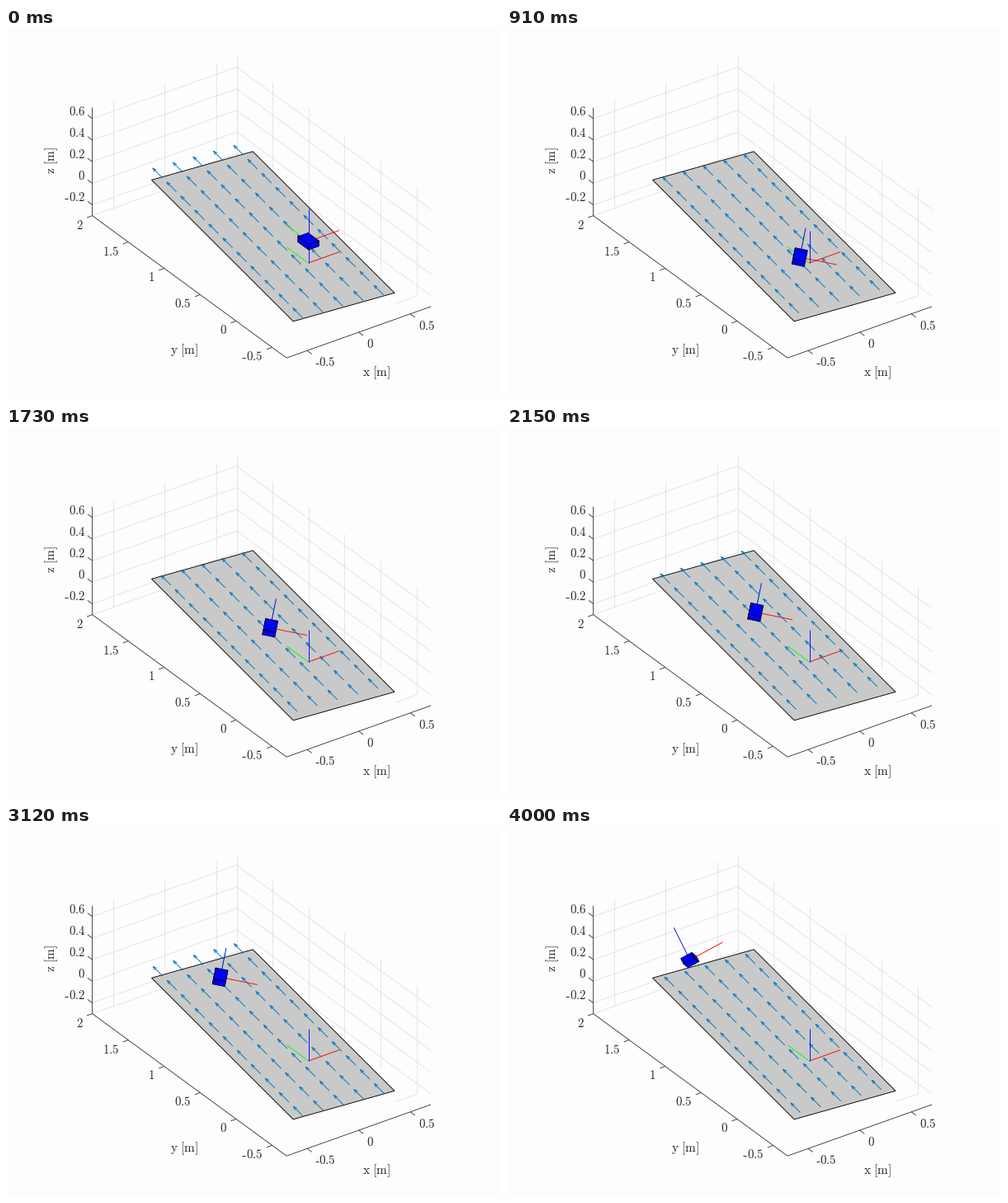
Write a matplotlib script that moves like this. It is 600 px wide and 450 px high and loops after 4.03 s.

```python
import matplotlib.pyplot as plt
import numpy as np
from matplotlib.animation import FuncAnimation
from matplotlib.collections import LineCollection, PolyCollection

plt.rcParams["mathtext.fontset"] = "cm"
W, H, DPI = 600, 450, 100
LOOP, TICK, STEP = 4030, 10, 40
PX = 72 / DPI                       # one pixel in points
INK = "#262626"

# Orthographic view: screen offset in pixels per metre along x, y, z
ORIGIN = np.array([366.5, 285])
VIEW = np.array([[125, -44.5], [-87.2, -63.9], [0, -131]])
SCALE = 152.4
LO, HI = np.array([-.7, -.7, -.3]), np.array([.7, 2, .7])

# Conveyor as a parallelogram on screen
TOP_LEFT = np.array([176, 183.8])
ACROSS, DOWN = np.array([122.7, -34.5]), np.array([171.7, 171.5])
BELT_DIR = np.array([1, .999])
GAP, BELT_STEP, ARROW = 17.0, 1.739, 11.7

# Box axes in camera terms (right, up, towards the viewer)
X0, Z0 = np.array([.82, .293, -.492]), np.array([0, .86, .511])
X1, Z1 = np.array([.98, -.198, 0]), np.array([.157, .775, .612])
HINGE = np.array([.827, .232, -.512])
SIZE = np.array([.1, .15, .05])
AXIS = .3
LAND, GRIP, TIP = 10.9, 21.8, 90


def project(*p):
    return ORIGIN + np.array(p) @ VIEW


def unit(v):
    return v / np.linalg.norm(v)


def flat(v):
    """Camera vector in metres to a screen offset."""
    return np.array([v[0], -v[1]]) * SCALE


fig = plt.figure(figsize=(W / DPI, H / DPI), dpi=DPI, facecolor="#fdfdfd")
ax = fig.add_axes([0, 0, 1, 1])
ax.set_xlim(0, W)
ax.set_ylim(H, 0)
ax.axis("off")


def lines(segs, color, z, width=.8):
    art = LineCollection(segs, colors=color, linewidths=width * PX, zorder=z)
    return ax.add_collection(art)


def number(x, y, value, ha, size=14.8):
    """Tick label; x is its left or right edge, y its middle."""
    body = f"{abs(value):g}"
    width = size * (1.278 if "." in body else .5)
    base = y + 4.2
    start = x if ha == "left" else x - width
    if value < 0:
        if ha == "left":
            start += .333 * size
        dash = start - .333 * size
        bar = base - .216 * size
        lines([[(dash + .2, bar), (dash + .276 * size, bar)]], INK, 2, 1)
    ax.text(start, base, rf"$\mathrm{{{body}}}$", size=size * PX,
            color=INK, ha="left", va="baseline")


def caption(x, y, letter, angle=0):
    ax.text(x, y, rf"$\mathrm{{{letter}\ [m]}}$", size=15.4 * PX, color=INK,
            ha="center", va="center", rotation=angle)


def draw_axes():
    xs, ys = np.arange(-.5, .6, .5), np.arange(-.5, 2.1, .5)
    zs = np.arange(-.2, .7, .2)
    grid = [[project(x, HI[1], LO[2]), project(x, HI[1], HI[2])] for x in xs]
    grid += [[project(HI[0], y, LO[2]), project(HI[0], y, HI[2])] for y in ys]
    for z in zs:
        grid.append([project(LO[0], HI[1], z), project(HI[0], HI[1], z),
                     project(HI[0], LO[1], z)])
    grid.append([project(LO[0], HI[1], LO[2]), project(HI[0], HI[1], LO[2])])
    grid.append([project(.5, -.5, LO[2]), project(HI[0], -.5, LO[2])])
    lines(grid, "#dfdfdf", 1)

    frame = [project(LO[0], HI[1], HI[2]), project(LO[0], HI[1], LO[2]),
             project(*LO), project(HI[0], LO[1], LO[2])]
    segs = [frame]
    along_x, along_y = 7 * unit(VIEW[0]), 7 * unit(VIEW[1])
    for x in xs:
        p = project(x, LO[1], LO[2])
        segs.append([p, p - along_y])
        number(p[0] + 9.5, p[1] + 15, x, "left")
    for y in ys:
        p = project(LO[0], y, LO[2])
        segs.append([p, p - along_x])
        number(p[0] - 12.5, p[1] + 11.7, y, "right")
    for z in np.round(zs, 1):
        p = project(LO[0], HI[1], z)
        segs.append([p, p + along_y])
        number(p[0] - 10, p[1] - 8.3, z + 0, "right")
    lines(segs, INK, 2)
    caption(449.5, 418, "x")
    caption(216.5, 391, "y")
    caption(55.5, 161, "z", 90)


def arrows(k):
    back = unit(BELT_DIR)
    side = np.array([-back[1], back[0]])
    first = (1.3 - BELT_STEP * k) % GAP
    segs = []
    for q in first + GAP * np.arange(-1, 11):
        if not -.8 <= q <= 172.4:
            continue
        for col in range(5):
            tail = TOP_LEFT + ACROSS * (.1 + .2 * col) + BELT_DIR * q
            tip = tail - BELT_DIR * ARROW
            neck = tip + 4.7 * back
            segs.append([tail, tip])
            segs.append([neck + 1.6 * side, tip, neck - 1.6 * side])
    return segs


def centre(k):
    """Drop, slip until the belt grips, ride, then fall off the end."""
    if k < LAND:
        return ORIGIN + [0, -26.2 + .257 * k * k]
    ride = k - 33
    if k < GRIP:
        ride += (GRIP - k) ** 2 / (2 * (GRIP - LAND))
    p = np.array([337.6, 260.8]) - ride * np.array([1.73, 1.72])
    p[1] += .17 * max(0, k - TIP) ** 2
    return p


def turn(v, angle):
    """Rotate about the end of the belt."""
    c, s = np.cos(angle), np.sin(angle)
    return v * c + np.cross(HINGE, v) * s + HINGE * (HINGE @ v) * (1 - c)


def pose(k):
    f = np.clip((k - LAND + .4) / (GRIP - LAND), 0, 1)
    f = f * f * (3 - 2 * f)
    z = unit(Z0 + (Z1 - Z0) * f)
    x = X0 + (X1 - X0) * f
    x = unit(x - z * (x @ z))
    if k > TIP:
        angle = -np.radians(65) * ((k - TIP) / 10) ** 1.6
        x, z = turn(x, angle), turn(z, angle)
    return np.array([x, np.cross(z, x), z])


def faces(mid, axes):
    """The three sides of the box that face the viewer."""
    polys = []
    half = axes * SIZE[:, None] / 2
    for i in range(3):
        out = half[i] if axes[i][2] > 0 else -half[i]
        a, b = half[i - 2], half[i - 1]
        polys.append([mid + flat(out + v)
                      for v in (a + b, a - b, -a - b, b - a)])
    return polys


draw_axes()
belt = [TOP_LEFT, TOP_LEFT + ACROSS, TOP_LEFT + ACROSS + DOWN, TOP_LEFT + DOWN]
ax.add_collection(PolyCollection([belt], facecolors="#c9c9c9",
                                 edgecolors="black", linewidths=.9 * PX,
                                 zorder=3))
flow = lines([], "#0072bd", 4, .9)
RGB = ["#ff0000", "#00ff00", "#0000ff"]
world = lines([[ORIGIN, project(*row)] for row in np.eye(3) * AXIS], RGB, 5, .9)
body = [lines([], c, 6, .9) for c in RGB]
box = ax.add_collection(PolyCollection([], facecolors="#0000ff",
                                       edgecolors="black",
                                       linewidths=.8 * PX, zorder=7))


def update(i):
    k = (i * TICK + 10) // STEP
    mid, axes = centre(k), pose(k)
    flow.set_segments(arrows(k))
    box.set_verts(faces(mid, axes))
    world.set_zorder(9 if mid[1] > 280 else 5)
    for line, axis, size in zip(body, axes, SIZE):
        line.set_segments([[mid + flat(axis * size / 2),
                            mid + flat(axis * AXIS)]])
        line.set_zorder(8 if axis[2] > .02 else 6)
    return [flow, box, world, *body]


anim = FuncAnimation(fig, update, frames=LOOP // TICK, interval=TICK,
                     repeat=True, repeat_delay=0)
plt.show()
```
